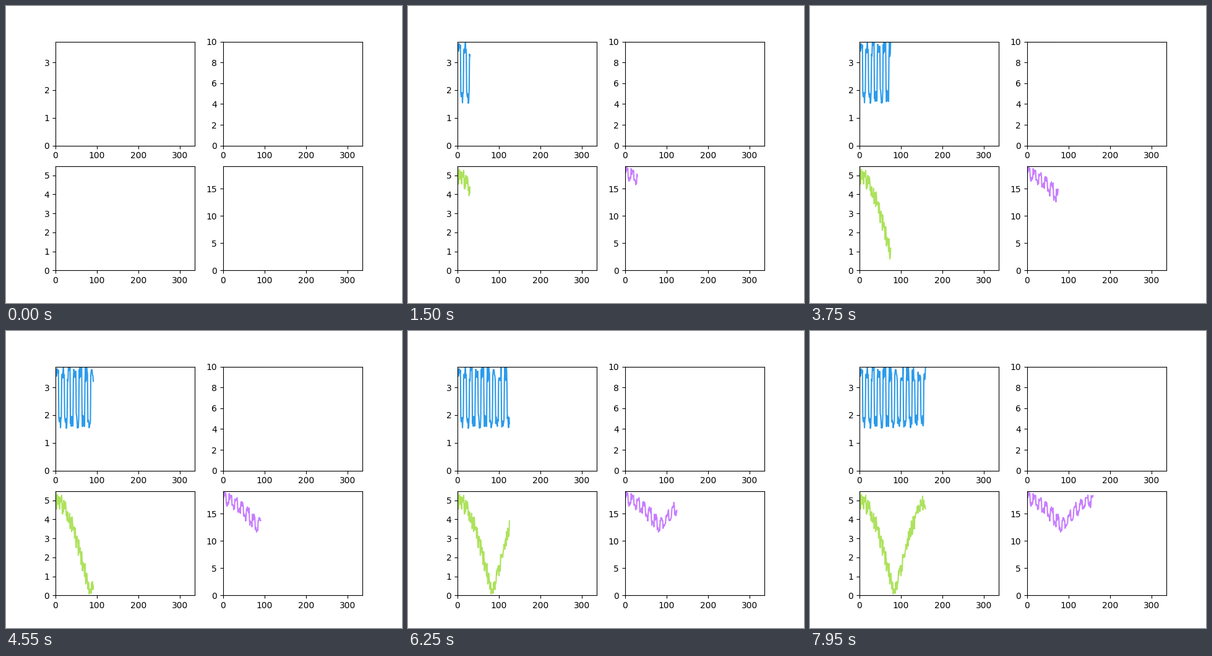
Recreate the animation shown at these times as a matplotlib script. Size 640 px wide and 480 px high, loop 8 s.

```python
import numpy as np
import matplotlib.pyplot as plt
from matplotlib.animation import FuncAnimation

SLOTS = 160
SPAN = 336
PERIOD = 14

rng = np.random.default_rng(14)
x = np.arange(1, SLOTS)


def noise(size):
    return rng.uniform(-size, size, len(x))


high = (x - 1) % PERIOD < PERIOD // 2
wave = np.where(high, 3.48, 1.78) + noise(0.27)
level = np.full(len(x), 10.0)
trend = np.abs(5 * np.abs(np.cos(2 * np.pi * x / SPAN)) + noise(0.47))
total = wave + level + trend

# data, top of the y axis, line colour
PANELS = [
    (wave, 3.749, "#2b9beb"),
    (level, 10, "gray"),
    (trend, 5.475, "#ade25d"),
    (total, 19.1, "#c77dff"),
]

fig, axes = plt.subplots(2, 2, figsize=(6.4, 4.8), dpi=100)
lines = []
for ax, (_, top, color) in zip(axes.flat, PANELS):
    ax.set_xlim(0, SPAN)
    ax.set_ylim(0, top)
    lines += ax.plot([], [], color=color)


def update(n):
    # the first two slots stay empty
    shown = n if n > 1 else 0
    for line, (data, _, _) in zip(lines, PANELS):
        line.set_data(x[:shown], data[:shown])
    return lines


anim = FuncAnimation(fig, update, frames=SLOTS, interval=50,
                     init_func=lambda: update(0), repeat=True, repeat_delay=0)
plt.show()
```
